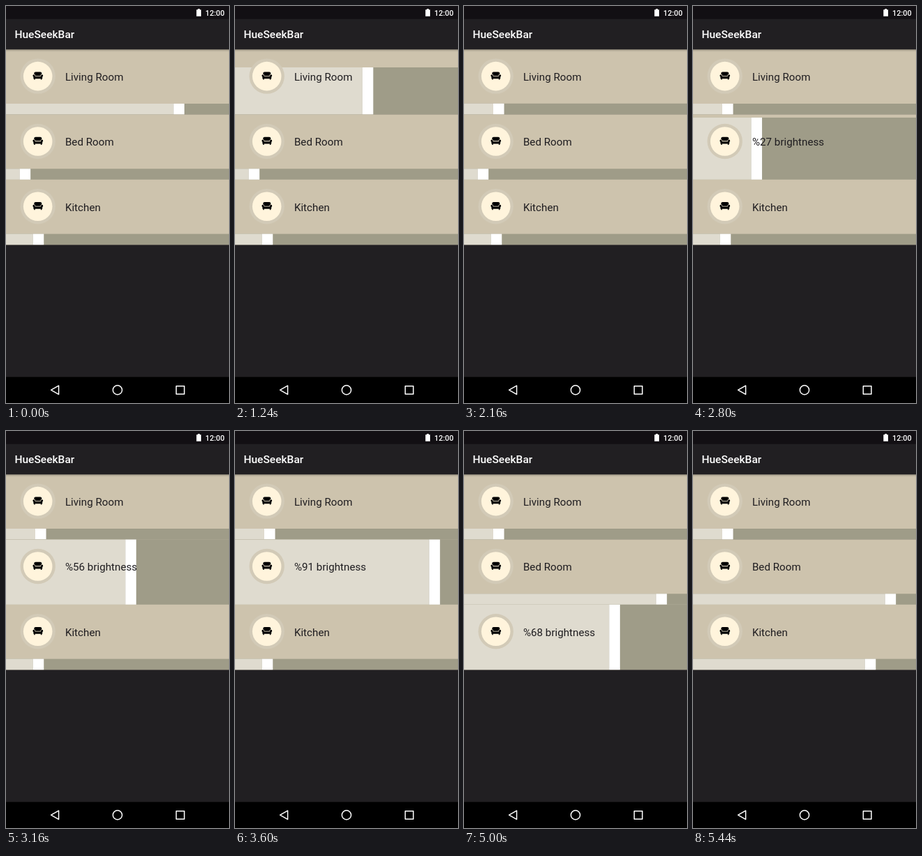
An HTML page for the animation above (5.48 s loop, 320 by 569 pixels).

```html
<!DOCTYPE html>
<html lang="en">
<head>
<meta charset="utf-8">
<title>HueSeekBar</title>
<style>
  html, body { margin: 0; width: 100%; height: 100%; overflow: hidden; background: #211f22; }
  svg { display: block; width: 100%; height: 100%; font-family: Roboto, sans-serif; }
</style>
</head>
<body>
<svg id="stage" viewBox="0 0 320 569">
  <defs>
    <linearGradient id="shade" x1="0" y1="0" x2="0" y2="1">
      <stop offset="0" stop-color="#000" stop-opacity=".36"/>
      <stop offset=".4" stop-color="#000" stop-opacity=".12"/>
      <stop offset="1" stop-color="#000" stop-opacity="0"/>
    </linearGradient>
    <g id="lamp">
      <circle cx="45.7" cy="38.4" r="25.2" fill="#d2cab7"/>
      <circle cx="45.7" cy="38.4" r="20.8" fill="#fff4dc"/>
      <path d="M40.3 35.4V34.2Q40.3 32.2 42.4 32.2H49.2Q51.3 32.2 51.3 34.2V35.4Q49.6 35.9 49.4 37.8H42.2Q42 35.9 40.3 35.4Z
               M38.4 37.6Q38.4 36 40 36Q41.6 36.1 41.7 38.6H49.9Q50 36.1 51.6 36Q53.2 36 53.2 37.6Q53.1 38.8 52.2 39.3V42H51.4V43.4H49.9V42H41.7V43.4H40.2V42H39.4V39.3Q38.5 38.8 38.4 37.6Z"/>
    </g>
  </defs>
  <rect width="320" height="569" fill="#211f22"/>
  <rect width="320" height="18.67" fill="#120f13"/>
  <path d="M273.3 5.2H275.3V4H278V5.2H280V14.8H273.3Z" fill="#fff"/>
  <text x="313.7" y="13.5" font-size="10.9" font-weight="500" text-anchor="end" fill="#fff">12:00</text>
  <text x="12.4" y="46.4" font-size="15.56" font-weight="500" fill="#fff">HueSeekBar</text>
  <g id="rows"></g>
  <rect y="62.2" width="320" height="3.6" fill="url(#shade)"/>
  <rect y="531.7" width="320" height="37.3" fill="#000"/>
  <g fill="none" stroke="#fff" stroke-width="1.5" stroke-linejoin="round">
    <path d="M64.6 550.4L75.6 544.1V556.7Z"/>
    <circle cx="160" cy="550.4" r="6.6"/>
    <rect x="244.3" y="544.7" width="11.6" height="11.6"/>
  </g>
</svg>
<script>
const LOOP = 5480, STEP = 40, SLIDE = 320;
const TOP = 62.2, ROW = 93.33, BAR = 15.56;

// path: [time, thumb x] of the drag
const rooms = [
  { name: 'Living Room', touch: 1040, open: 1045, close: 1850,
    path: [[1020, 240.4], [1240, 182.8], [1760, 61.1], [1840, 42]] },
  { name: 'Bed Room', touch: 2520, open: 2529, close: 3605,
    path: [[2500, 19.6], [2800, 83.5], [3600, 278.6], [3640, 275.6]] },
  { name: 'Kitchen', touch: 4640, open: 4570, close: 5093,
    path: [[4600, 38.7], [4640, 35.5], [5080, 246.7]] }
];

const clamp = v => Math.min(1, Math.max(0, v));
const ease = v => (1 - Math.cos(Math.PI * clamp(v))) / 2;

function along(path, t) {
  let x = path[0][1];
  for (let i = 1; i < path.length; i++) {
    const [t0, x0] = path[i - 1], [t1, x1] = path[i];
    if (t > t0) x = x0 + (x1 - x0) * clamp((t - t0) / (t1 - t0));
  }
  return x;
}

function add(parent, tag, attrs) {
  const el = document.createElementNS('http://www.w3.org/2000/svg', tag);
  set(el, attrs);
  return parent.appendChild(el);
}

function set(el, attrs) {
  for (const key in attrs) el.setAttribute(key, attrs[key]);
}

const list = document.getElementById('rows');
rooms.forEach((room, i) => {
  const g = add(list, 'g', { transform: `translate(0 ${TOP + i * ROW})` });
  add(g, 'rect', { width: 320, height: ROW, fill: '#cdc3ad' });
  room.track = add(g, 'rect', { width: 320, fill: '#9f9c88' });
  room.done = add(g, 'rect', { fill: '#dfdbcf' });
  room.thumb = add(g, 'rect', { width: BAR, fill: '#fff' });
  add(g, 'use', { href: '#lamp' });
  room.label = add(g, 'text', { x: 84.9, y: 44.9, 'font-size': 15.2, fill: '#1f1d20' });
});

function draw(t) {
  for (const room of rooms) {
    const grown = t < room.touch ? 0
      : ease((t - room.open) / SLIDE) - ease((t - room.close) / SLIDE);
    const x = along(room.path, t);
    const height = BAR + (ROW - BAR) * grown;
    const y = ROW - height;
    set(room.track, { y, height });
    set(room.done, { y, height, width: x });
    set(room.thumb, { x, y, height });
    const percent = Math.floor(x / (320 - BAR) * 100);
    room.label.textContent = grown > 0.8 ? `%${percent} brightness` : room.name;
  }
}

const start = performance.now();
function tick() {
  const t = (performance.now() - start) % LOOP;
  draw(Math.floor(t / STEP) * STEP);
  requestAnimationFrame(tick);
}
tick();
</script>
</body>
</html>
```
